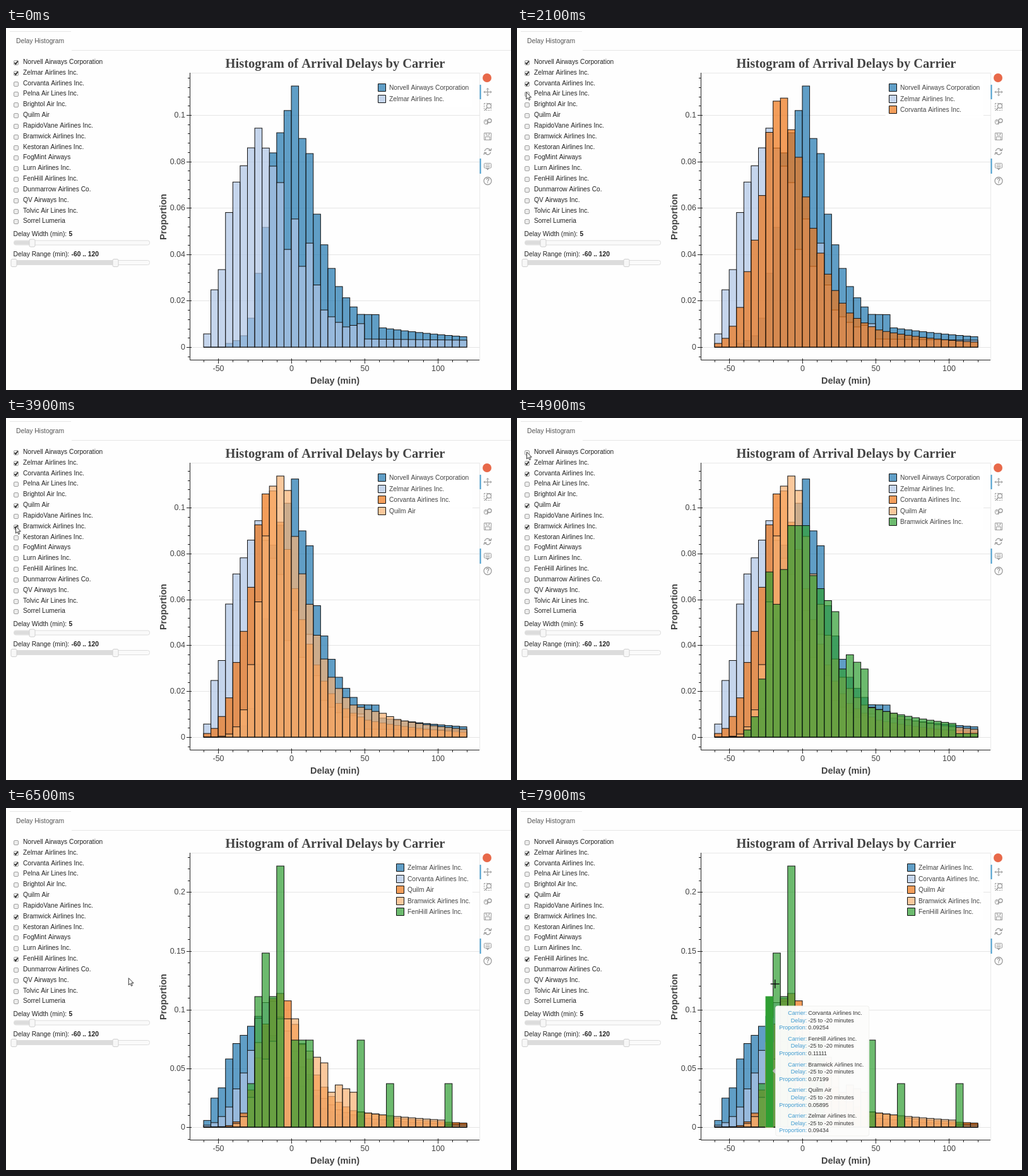
An HTML page with a canvas that plays this animation: 800 px wide and 574 px high, repeating every 8000 ms.

```html
<!DOCTYPE html>
<html lang="en">
<head>
<meta charset="utf-8">
<title>Delay Histogram</title>
<style>
html, body { margin: 0; width: 800px; height: 574px; overflow: hidden; background: #fefefe; }
canvas { display: block; }
</style>
</head>
<body>
<canvas id="stage" width="800" height="574"></canvas>
<script>
const c = document.getElementById('stage').getContext('2d');
const SANS = '"Liberation Sans", Arial, sans-serif';
const SERIF = '"Liberation Serif", Times, serif';
const LOOP = 8000, BINS = 36, BASE = 506;
const PALETTE = ['#1f77af', '#aec5e6', '#f07616', '#fab274', '#2f9e33'];

const carriers = ['Norvell Airways Corporation', 'Zelmar Airlines Inc.', 'Corvanta Airlines Inc.',
  'Pelna Air Lines Inc.', 'Brightol Air Inc.', 'Quilm Air', 'RapidoVane Airlines Inc.',
  'Bramwick Airlines Inc.', 'Kestoran Airlines Inc.', 'FogMint Airways', 'Lurn Airlines Inc.',
  'FenHill Airlines Inc.', 'Dunmarrow Airlines Co.', 'QV Airways Inc.', 'Tolvic Air Lines Inc.',
  'Sorrel Lumeria'];

// A histogram through [bin, proportion * 10000] points, geometric in between.
function curve(...points) {
  return Array.from({length: BINS}, (_, bin) => {
    if (bin < points[0][0]) return 0;
    const i = Math.max(1, points.findIndex(p => p[0] >= bin));
    const [b0, v0] = points[i - 1], [b1, v1] = points[i];
    return v0 * (v1 / v0) ** ((bin - b0) / (b1 - b0)) / 1e4;
  });
}
// A tiny carrier: 27 flights counted per bin.
const flights = counts => Array.from({length: BINS}, (_, bin) => (counts[bin] || 0) / 27);

const data = {
  0: curve([3, 16], [5, 49], [7, 318], [9, 837], [12, 1125], [13, 899], [14, 834], [15, 573],
    [18, 261], [21, 141], [23, 140], [24, 83], [35, 45]),
  1: curve([0, 57], [1, 247], [2, 334], [3, 580], [4, 711.2], [7, 943.4], [10, 709], [11, 421],
    [12, 552], [13, 348], [14, 448], [16, 160], [19, 87], [21, 101], [22, 35], [35, 30]),
  2: curve([0, 16], [2, 90], [4, 325.4], [7, 925.4], [8, 1060], [9, 1073], [11, 818], [14, 405],
    [18, 147], [22, 74], [35, 22]),
  5: curve([2, 4], [4, 44.8], [6, 316], [7, 589.5], [8, 877], [9, 1094], [10, 1138], [11, 1075],
    [14, 579], [17, 261], [20, 140], [24, 104], [26, 77], [35, 35]),
  7: curve([4, 31.3], [7, 719.9], [8, 579], [10, 922], [12, 922], [13, 704], [16, 547], [17, 297],
    [18, 359], [20, 297], [21, 128], [32, 60], [33, 16], [35, 16]),
  11: flights({6: 1, 7: 3, 8: 4, 9: 3, 10: 6, 12: 2, 13: 2, 14: 2, 21: 2, 25: 1, 33: 1})
};

// Each visit: the pointer arrives, waits and toggles one checkbox.
const clicks = [[1500, 2], [2600, 5], [3700, 7], [4700, 0], [5650, 11]];
const REDRAW_LAG = 400, HOVER_LAG = 115;
const rowY = i => 16.83 * i;
const path = [[0, -14, 150], [700, -14, 150], [1200, 14, 90]];
for (const [at, id] of clicks.slice(1)) path.push([at - 700, path.at(-1)[1], path.at(-1)[2]], [at - 80, 15, 54 + rowY(id)]);
path.push([6150, 17, 238], [6850, 369, 301], [7000, 369, 301], [7700, 400, 279], [LOOP, 413, 279]);

const BIN_W = 5 * 417 / 180;
const xOf = min => 452 + min * BIN_W / 5;

function selected(t) {
  const set = new Set([0, 1]);
  for (const [at, id] of clicks) {
    if (t >= at) set.has(id) ? set.delete(id) : set.add(id);
  }
  return [...set].sort((a, b) => a - b);
}

function pointer(t) {
  const i = Math.max(1, path.findIndex(p => p[0] >= t));
  const [t0, x0, y0] = path[i - 1], [t1, x1, y1] = path[i];
  let k = Math.max(0, (t - t0) / (t1 - t0));
  if (t < 7000) k = k * k * (3 - 2 * k);
  return {x: x0 + (x1 - x0) * k, y: y0 + (y1 - y0) * k};
}
const inPlot = p => p.x > 292 && p.x < 750;

function text(str, x, y, size, color = '#222', align = 'left', weight = '', family = SANS) {
  c.font = `${weight} ${size}px ${family}`;
  c.fillStyle = color;
  c.textAlign = align;
  c.fillText(str, x, y);
}

function line(color, width, ...pts) {
  c.strokeStyle = color;
  c.lineWidth = width;
  c.beginPath();
  for (let i = 0; i < pts.length; i += 2) c.lineTo(pts[i], pts[i + 1]);
  c.stroke();
}

function box(x, y, w, h, r, fill, stroke) {
  c.beginPath();
  c.roundRect(x, y, w, h, r);
  if (fill) { c.fillStyle = fill; c.fill(); }
  if (stroke) { c.strokeStyle = stroke; c.lineWidth = 1; c.stroke(); }
}

function ring(x, y, r, width = 1.3, from = 0, to = 7) {
  c.lineWidth = width;
  c.beginPath();
  c.arc(x, y, r, from, to);
  c.stroke();
}

function slider(y, label, value, valueX, from, to, handles) {
  text(label, 11.5, y - 10.5, 10.3);
  text(value, valueX, y - 10.5, 10.3, '#222', 'left', 'bold');
  box(12.5, y - 3.5, 215, 7, 3, '#fafafa', '#ddd');
  box(from, y - 3, to - from, 6, 2, '#dcdcdc');
  for (const x of handles) box(x - 4.5, y - 5.5, 9, 12, 2, '#f7f7f7', '#d0d0d0');
}

function panel(checked) {
  line('#e6e6e6', 1, 6, 5.5, 103, 5.5);
  line('#e6e6e6', 1, 104, 35.5, 800, 35.5);
  text('Delay Histogram', 16, 24, 10.3, '#555');
  carriers.forEach((name, i) => {
    const y = rowY(i);
    text(name, 27, 57 + y, 10.2);
    box(12.5, 51.5 + Math.round(y), 7, 7, 1.5, '#ececec', '#a0a0a0');
    if (checked.includes(i)) line('#222', 1.6, 13.5, 55 + y, 15.3, 57.2 + y, 18.7, 52.5 + y);
  });
  slider(340.5, 'Delay Width (min):', '5', 99.5, 13, 41, [41.5]);
  slider(372, 'Delay Range (min):', '-60 .. 120', 103.5, 13, 173, [12.5, 173.5]);
}

function toolbar() {
  const g = '#9a9a9a';
  c.fillStyle = '#e8694a';
  c.beginPath();
  c.arc(762, 79, 7, 0, 7);
  c.fill();
  line('#4a9fcf', 2, 751.5, 90, 751.5, 113);
  line('#4a9fcf', 2, 751.5, 207, 751.5, 231);
  // pan
  for (const [dx, dy] of [[1, 0], [-1, 0], [0, 1], [0, -1]]) {
    const x = 763 + dx * 6, y = 101.5 + dy * 6;
    line(g, 1.2, 763, 101.5, x, y);
    line(g, 1, x - dx * 2 - dy * 2, y - dy * 2 - dx * 2, x, y, x - dx * 2 + dy * 2, y - dy * 2 + dx * 2);
  }
  // box zoom
  c.setLineDash([2, 1.5]);
  box(757.5, 119.5, 11, 11, 0, null, g);
  c.setLineDash([]);
  ring(765, 123.5, 3.5);
  line(g, 1.6, 762.5, 126, 759, 130);
  // wheel zoom
  box(757.5, 145.5, 5, 7, 2.5, null, g);
  line(g, 1, 760, 146, 760, 149);
  ring(766, 147, 3);
  line(g, 1.5, 764, 149.5, 762, 153);
  // save
  box(757.5, 166.5, 11, 11, 0, null, g);
  box(760.5, 166.5, 5, 3.5, 0, null, g);
  box(759.5, 172.5, 7, 5, 0, null, g);
  // reset
  ring(763, 196, 4.7, 1.4, 3.3, 5.9);
  ring(763, 196, 4.7, 1.4, 0.2, 2.8);
  line(g, 1.3, 769, 191, 768, 194.5, 764.5, 194);
  line(g, 1.3, 757, 201, 758, 197.5, 761.5, 198);
  // hover
  box(757.5, 214.5, 11, 7.5, 1, null, g);
  line(g, 1, 759.5, 217, 766.5, 217);
  line(g, 1, 759.5, 219.5, 766.5, 219.5);
  line(g, 1.3, 761, 222, 763, 224.5, 765, 222);
  // help
  ring(763, 242.5, 6);
  text('?', 763, 246, 10, g, 'center', 'bold');
}

function bars(shown, yOf, hot) {
  const draw = (id, k, bin, alpha) => {
    const x = xOf(-60 + 5 * bin), y = yOf(data[id][bin]);
    c.globalAlpha = alpha;
    c.fillStyle = PALETTE[k];
    c.fillRect(x, y, BIN_W, BASE - y);
    c.globalAlpha = 1;
    c.strokeStyle = alpha < 1 ? '#111' : PALETTE[k];
    c.lineWidth = 1;
    c.strokeRect(x, y, BIN_W, BASE - y);
  };
  shown.forEach((id, k) => {
    for (let bin = 0; bin < BINS; bin++) if (bin !== hot) draw(id, k, bin, 0.7);
  });
  if (hot >= 0) shown.forEach((id, k) => draw(id, k, hot, 1));
}

function legend(shown) {
  const left = shown.includes(0) ? 589.5 : 618.5;
  box(left - 6, 81, 745 - left, shown.length * 17.6 + 9, 0, 'rgba(255,255,255,.92)');
  shown.forEach((id, k) => {
    const y = Math.round(88 + 17.6 * k) + 0.5;
    c.globalAlpha = 0.7;
    box(left, y, 12, 12, 0, PALETTE[k]);
    c.globalAlpha = 1;
    box(left, y, 12, 12, 0, null, '#111');
    text(carriers[id], left + 17.5, y + 9.2, 10.2, '#444');
  });
}

function chart(shown, hot) {
  const max = Math.max(...shown.flatMap(id => data[id]));
  const yOf = v => BASE - v / max * 414;
  const step = max > 0.2 ? 0.05 : 0.02;

  text('Histogram of Arrival Delays by Carrier', 521.5, 63, 20.5, '#444', 'center', 'bold', SERIF);
  box(291.5, 71.5, 459, 455, 0, null, '#e8e8e8');
  for (let v = 0; yOf(v) > 71; v += step) {
    const y = Math.round(yOf(v)) + 0.5;
    line('#e5e5e5', 1, 292, y, 750, y);
  }
  bars(shown, yOf, hot);

  line('#222', 1, 291.5, 71, 291.5, 526.5, 750, 526.5);
  for (let n = -1; yOf(n * step / 5) > 71; n++) {
    const y = Math.round(yOf(n * step / 5)) + 0.5, major = n % 5 === 0;
    line('#222', 1, major ? 286 : 288, y, major ? 294 : 291, y);
    if (major) text(String(+(n * step / 5).toFixed(2)), 284, y + 3.5, 12.5, '#444', 'right');
  }
  for (let m = -60; m <= 120; m += 10) {
    const x = Math.round(xOf(m)) + 0.5, major = m % 50 === 0;
    line('#222', 1, x, major ? 524 : 527, x, major ? 532 : 530);
    if (major) text(String(m), x, 544, 12.5, '#444', 'center');
  }
  text('Delay (min)', 521, 563.5, 14.5, '#444', 'center', 'bold');
  c.save();
  c.translate(254, 299.5);
  c.rotate(-Math.PI / 2);
  text('Proportion', 0, 0, 14.3, '#444', 'center', 'bold');
  c.restore();
  legend(shown);
}

function tooltip(p, bin) {
  const x = p.x + 6, y = p.y + 35, from = -60 + 5 * bin;
  const order = bin < 6 ? [11, 2, 7, 5, 1] : [2, 11, 7, 5, 1];
  c.fillStyle = '#bbb';
  c.beginPath();
  c.moveTo(x - 5, y + 103);
  c.lineTo(x, y + 98);
  c.lineTo(x, y + 108);
  c.fill();
  box(x, y, 148, 206, 3, 'rgba(252,252,251,.97)', '#f0f0ee');
  order.forEach((id, k) => {
    const rows = [['Carrier:', carriers[id]], ['Delay:', `${from} to ${from + 5} minutes`],
      ['Proportion:', data[id][bin].toFixed(5)]];
    rows.forEach(([label, value], r) => {
      const by = y + 14 + 40.75 * k + 11.7 * r;
      text(label, x + 49.5, by, 9, '#3f9bd0', 'right');
      text(value, x + 51.5, by, 9, '#333');
    });
  });
}

function cursor(p) {
  if (inPlot(p)) {
    line('#111', 1.5, p.x - 7, p.y, p.x + 7, p.y);
    line('#111', 1.5, p.x, p.y - 7, p.x, p.y + 7);
    return;
  }
  c.save();
  c.translate(p.x + 0.5, p.y);
  c.beginPath();
  for (const [x, y] of [[0, 0], [0, 11], [2.6, 8.7], [4.3, 12.6], [6, 11.8], [4.4, 8], [7.8, 8]]) c.lineTo(x, y);
  c.closePath();
  c.fillStyle = '#fff';
  c.fill();
  c.strokeStyle = '#333';
  c.lineWidth = 1;
  c.stroke();
  c.restore();
}

function render(t) {
  c.fillStyle = '#fefefe';
  c.fillRect(0, 0, 800, 574);
  const seen = pointer(Math.max(0, t - HOVER_LAG));
  const bin = Math.floor((seen.x - xOf(-60)) / BIN_W);
  const hot = inPlot(seen) && bin >= 0 && bin < BINS ? bin : -1;
  panel(selected(t));
  chart(selected(t - REDRAW_LAG), hot);
  toolbar();
  if (hot >= 0) tooltip(seen, hot);
  cursor(pointer(t));
}

const start = performance.now();
function frame() {
  render((performance.now() - start) % LOOP);
  requestAnimationFrame(frame);
}
frame();
</script>
</body>
</html>
```
